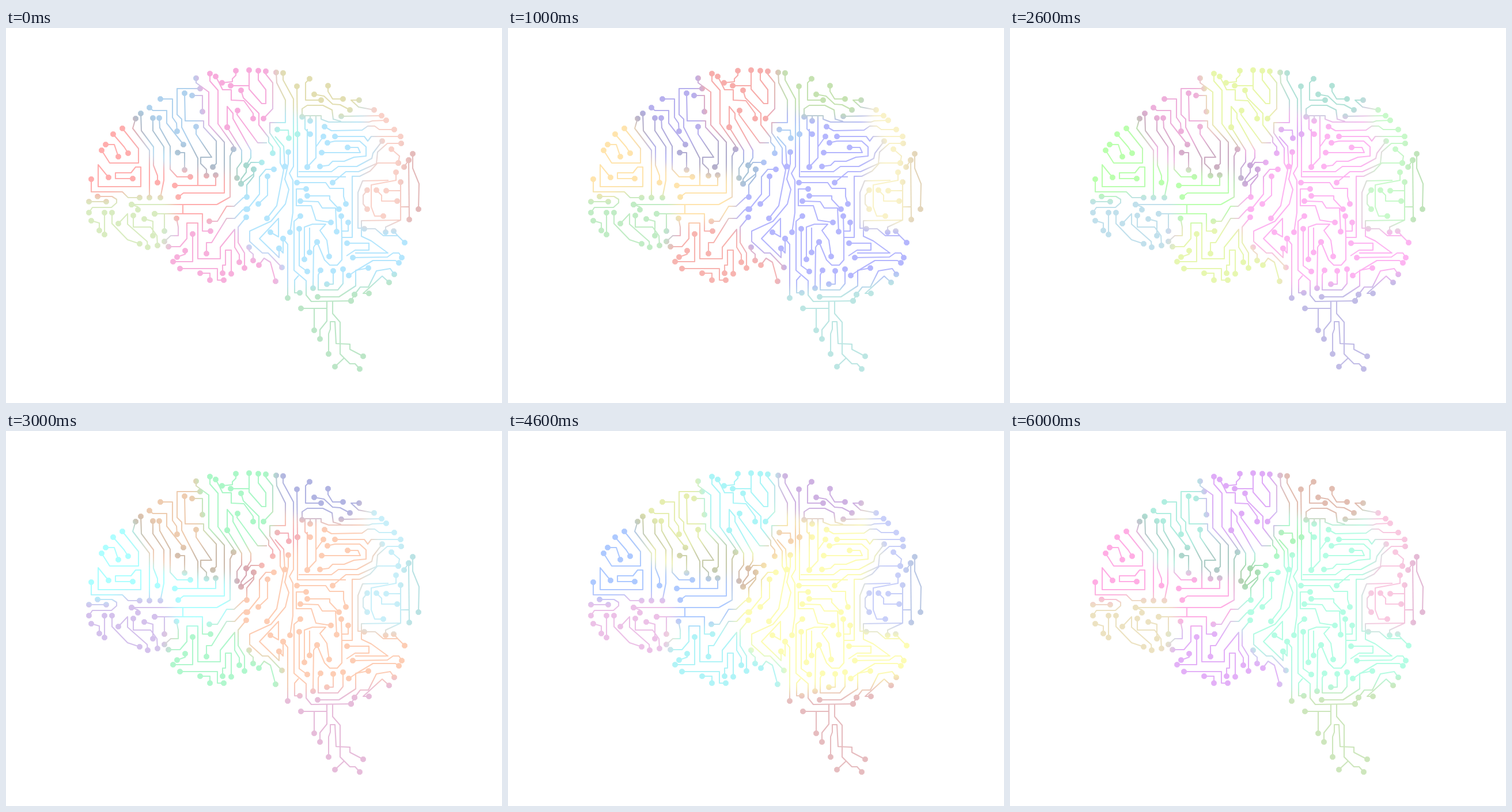
Recreate the animation shown at these times as an HTML page. Size 861x650 px, loop 7 s.

```html
<!DOCTYPE html>
<html lang="en">
<head>
<meta charset="utf-8">
<title>Circuit brain</title>
<style>
html, body { margin: 0; width: 100%; height: 100%; overflow: hidden; background: #fff; }
svg { display: block; width: 861px; height: 650px; }
#traces path { fill: none; stroke: #fff; stroke-width: 2.1; stroke-linejoin: round; marker-start: url(#dot); }
#traces .both path { marker-end: url(#dot); }
#traces .bare path { marker: none; }
</style>
</head>
<body>
<svg viewBox="0 0 861 650">
<defs>
<marker id="dot" markerUnits="userSpaceOnUse" markerWidth="12" markerHeight="12" refX="6" refY="6">
  <path d="M4 1.2H8L10.8 4V8L8 10.8H4L1.2 8V4Z" fill="#fff"/>
</marker>
<filter id="soft" filterUnits="userSpaceOnUse" x="0" y="0" width="861" height="650" color-interpolation-filters="sRGB">
  <feGaussianBlur stdDeviation="9"/>
</filter>
<mask id="traces" maskUnits="userSpaceOnUse" x="0" y="0" width="861" height="650">
<!-- frontal -->
<g class="both">
  <path d="M202 174L230 209V234H180L166 212"/>
  <path d="M186 184L205 206 212 217"/>
  <path d="M173 202H188L195 223"/>
  <path d="M148 262V284H202L212 294H232"/>
  <path d="M178 259L160 237V275H234V241H225L217 251H190V261H220"/>
  <path d="M159 292H184L192 297V303L183 311H150L144 320"/>
  <path d="M144 301H174"/>
  <path d="M225 157L220 174 249 212V294"/>
  <path d="M234 148L235 178 256 206V238L263 256V268"/>
  <path d="M255 156V178L274 206V264L268 294"/>
  <path d="M266 156L267 173 285 205V245L297 258H320"/>
  <path d="M249 138L255 143H279V165L308 202"/>
  <path d="M268 123H289V155L296 165 297 179"/>
  <path d="M298 216H310V246"/>
  <path d="M323 117H341V145"/>
  <path d="M310 113L311 161H343V172L365 196V235L359 241"/>
  <path d="M330 171V184L357 224H338V235L348 245V256"/>
  <path d="M293 273H364V255"/>
  <path d="M330 87V95L352 111V168L379 198V286H308L299 293"/>
  <path d="M354 79V92L368 108V166L395 204V210"/>
</g>
<g>
  <path d="M337 105H297V150L305 158V172L333 226V272"/>
  <path d="M395 210L389 222V293L366 306"/>
  <path d="M218 306H366"/>
</g>
<!-- lower left -->
<g class="both">
  <path d="M148 334L162 338V351"/>
  <path d="M171 320V358"/>
  <path d="M184 320V339L211 367 232 374"/>
  <path d="M195 339L211 322V340L245 370 246 380"/>
  <path d="M221 325V345H251L262 360 263 377"/>
  <path d="M240 331L255 335V360"/>
  <path d="M258 322H275V352"/>
  <path d="M218 306L229 310V315"/>
  <path d="M296 330L299 345V360H286L275 370"/>
  <path d="M355 352H341V322H258"/>
</g>
<g class="bare"><path d="M307 306V322"/></g>
<!-- temporal -->
<g class="both">
  <path d="M353 335H367L383 309H396L412 294 418 293"/>
  <path d="M417 314L411 315 397 330H383L357 372H348V391"/>
  <path d="M417 328L403 345V372L414 390V416"/>
  <path d="M282 379H302L314 365V338H333V400H372V380L397 349V380L405 393V406"/>
  <path d="M324 357V405H290"/>
  <path d="M302 417H367V437H378"/>
  <path d="M376 425V411H381V385H391V426"/>
  <path d="M337 425H354V437"/>
  <path d="M311 386V392L297 397"/>
  <path d="M422 380V386L429 392V403"/>
  <path d="M439 411L448 399 459 406 468 439"/>
</g>
<!-- top -->
<g class="both">
  <path d="M364 84L370 95 376 107H391V125L413 126 429 148V157"/>
  <path d="M375 95L393 93V88L399 82V74"/>
  <path d="M422 73V106L444 131H451V107L438 90V74"/>
  <path d="M451 75V80L463 95V140L447 157"/>
  <path d="M408 108L412 121 439 148V168L456 190V198L463 206V217"/>
  <path d="M384 172V136L394 148V157L425 212V225L417 238"/>
  <path d="M384 172L409 212V232L401 243V260"/>
  <path d="M417 238V250L408 262V270"/>
  <path d="M430 245V253L408 270"/>
  <path d="M471 176L476 177H490L491 191"/>
  <path d="M469 77L470 95 485 125V164H458V182L476 208V234L482 246 470 308 453 330"/>
  <path d="M481 78V90L499 123V240L492 252 498 264V320L493 354"/>
</g>
<g>
  <path d="M390 100H422"/>
  <path d="M402 143L401 150 437 199H453"/>
  <path d="M444 233H425L418 243"/>
  <path d="M506 184V258H590"/>
</g>
<!-- upper right -->
<g class="both">
  <path d="M505 101L506 184"/>
  <path d="M527 88L520 95V125H547"/>
  <path d="M535 115L552 118 567 132 580 133 597 142"/>
  <path d="M559 100V110L567 123H585"/>
  <path d="M613 125H599L612 137 639 142"/>
  <path d="M582 153L652 152"/>
  <path d="M528 184L519 175V152H547V158L560 163H630L636 161 660 160"/>
  <path d="M553 171L565 178 618 177 628 170H640L648 176H674"/>
  <path d="M571 188H622L628 196 634 188H685"/>
  <path d="M558 199L571 196H614L625 206V222L604 224 587 231H567L560 238 545 240"/>
  <path d="M593 207H611L615 216H548"/>
  <path d="M551 188L538 206V225L523 241"/>
  <path d="M686 200H662L645 215 643 235 612 249H590L567 268"/>
</g>
<g>
  <path d="M514 154V140L523 134H550L566 142 568 158 582 162"/>
  <path d="M528 161V152"/>
  <path d="M653 196L637 217 635 226 609 240H577L565 249H508"/>
  <path d="M523 241V175"/>
</g>
<g class="bare"><path d="M538 152V206"/></g>
<!-- right -->
<g class="both">
  <path d="M681 234H645L632 248 614 257H601V363H583L582 326"/>
  <path d="M669 210L683 222 681 234"/>
  <path d="M706 218V243L717 270 716 314"/>
  <path d="M699 229L700 332"/>
  <path d="M691 241L699 229"/>
  <path d="M627 281L620 290V305L627 314"/>
  <path d="M677 250V264L634 272V310L640 326H655"/>
  <path d="M643 281L652 290V300H679"/>
  <path d="M685 267V333L659 345V354"/>
  <path d="M622 348H641L655 360H680L692 372"/>
  <path d="M673 352L680 360"  style="marker-end:none"/>
</g>
<g>
  <path d="M660 282H685"/>
  <path d="M592 373H630V385H606L591 395"/>
</g>
<g class="bare">
  <path d="M664 264L619 265 611 285V347H622"/>
  <path d="M685 333L617 334V361L634 369 663 390H606"/>
  <path d="M685 310H700"/>
</g>
<!-- centre left -->
<g class="both">
  <path d="M454 257V290L438 305"/>
  <path d="M465 245H451L440 258V288L419 314"/>
  <path d="M490 215V235L484 262 491 280 485 305 460 335 423 352V370L445 390H455L479 415"/>
  <path d="M474 382V398L440 365 473 330V362L459 354"/>
  <path d="M481 365V390L474 382"/>
</g>
<g>
  <path d="M484 240L482 205 467 188"/>
  <path d="M430 245V257L418 272V293"/>
</g>
<!-- centre -->
<g class="both">
  <path d="M505 268H555L562 278H586V292L590 305"/>
  <path d="M521 279H504V308H530L538 333 564 337"/>
  <path d="M511 300L542 301 549 312H572L574 353"/>
  <path d="M523 291H562V297L578 314"/>
  <path d="M518 401V345L532 340H555L545 351 557 368 561 396"/>
  <path d="M509 348V412L523 422"/>
  <path d="M540 371L534 380 533 451"/>
  <path d="M546 420L542 428V454H576L585 443V418"/>
  <path d="M557 444H568V421"/>
  <path d="M511 326L500 335V420L521 438V463L530 474 599 473"/>
  <path d="M481 365L489 375V468"/>
</g>
<g>
  <path d="M527 389V346"/>
  <path d="M594 337V352H583"/>
  <path d="M540 371L553 402 562 411H575L583 402V363"/>
</g>
<!-- lower right -->
<g class="both">
  <path d="M602 398L662 397 672 390H682L687 398"/>
  <path d="M682 407L676 403H637L607 421 595 429"/>
  <path d="M629 416L607 420V447L578 466H541"/>
  <path d="M674 427L667 417 643 421 629 449H615L605 462"/>
  <path d="M665 441L653 430 620 460H630"/>
  <path d="M605 462L599 473"/>
</g>
<g><path d="M510 459H501V437L508 429"/></g>
<!-- stem -->
<g class="both">
  <path d="M571 587L587 572 597 582H606L614 591"/>
  <path d="M560 565V530L563 522V509H571L573 547 597 548V557L620 569"/>
</g>
<g>
  <path d="M512 486H557"/>
  <path d="M535 524V486"/>
  <path d="M545 539V523L557 508V474"/>
</g>
<g class="bare"><path d="M567 474V495L580 510V565L587 572"/></g>
</mask>
</defs>
<g mask="url(#traces)">
  <rect id="base" width="861" height="650"/>
  <g id="lobes" filter="url(#soft)"></g>
</g>
</svg>
<script>
// Each lobe: hue, saturation, lightness, outline
const lobes = [
  [0, 100, 84, "110,150 215,150 250,230 300,245 400,235 392,330 300,342 110,310"],
  [207, 25, 74, "205,135 245,140 310,200 375,185 405,200 400,240 365,258 335,250 290,222 230,185"],
  [207, 64, 81, "236,60 336,60 350,195 312,208 285,195 240,150"],
  [321, 82, 82, "328,40 466,40 466,160 452,205 400,202 372,185 346,180"],
  [55, 46, 79, "467,40 630,40 622,132 600,158 500,150 470,130"],
  [11, 80, 88, "630,120 760,120 760,350 612,345 612,270 650,205 622,165"],
  [0, 42, 81, "692,195 760,195 760,350 692,350"],
  [86, 53, 84, "110,288 180,296 205,284 285,288 290,320 270,410 110,410"],
  [323, 82, 83, "272,390 302,338 398,338 425,390 478,402 478,460 272,460"],
  [136, 45, 82, "470,454 540,450 610,446 690,425 700,640 470,640"],
  [165, 38, 75, "392,228 432,222 440,258 412,285 392,270"],
  [170, 75, 82, "436,222 462,165 515,160 518,195 465,218 445,245"]
];
const turns = [0, 40, 111, 181, 220, 300, 320];
const layer = document.getElementById("lobes");
const base = document.getElementById("base");

const shapes = lobes.map(([, , , points]) => {
  const shape = document.createElementNS("http://www.w3.org/2000/svg", "polygon");
  shape.setAttribute("points", points);
  return layer.appendChild(shape);
});

function tint(shape, h, s, l, turn) {
  shape.setAttribute("fill", `hsl(${(h + turn) % 360}, ${s}%, ${l}%)`);
}

let shown = -1;
function draw() {
  const step = Math.floor(performance.now() / 1000) % turns.length;
  if (step !== shown) {
    shown = step;
    tint(base, 199, 95, 85, turns[step]);
    lobes.forEach(([h, s, l], i) => tint(shapes[i], h, s, l, turns[step]));
  }
  requestAnimationFrame(draw);
}
draw();
</script>
</body>
</html>
```
